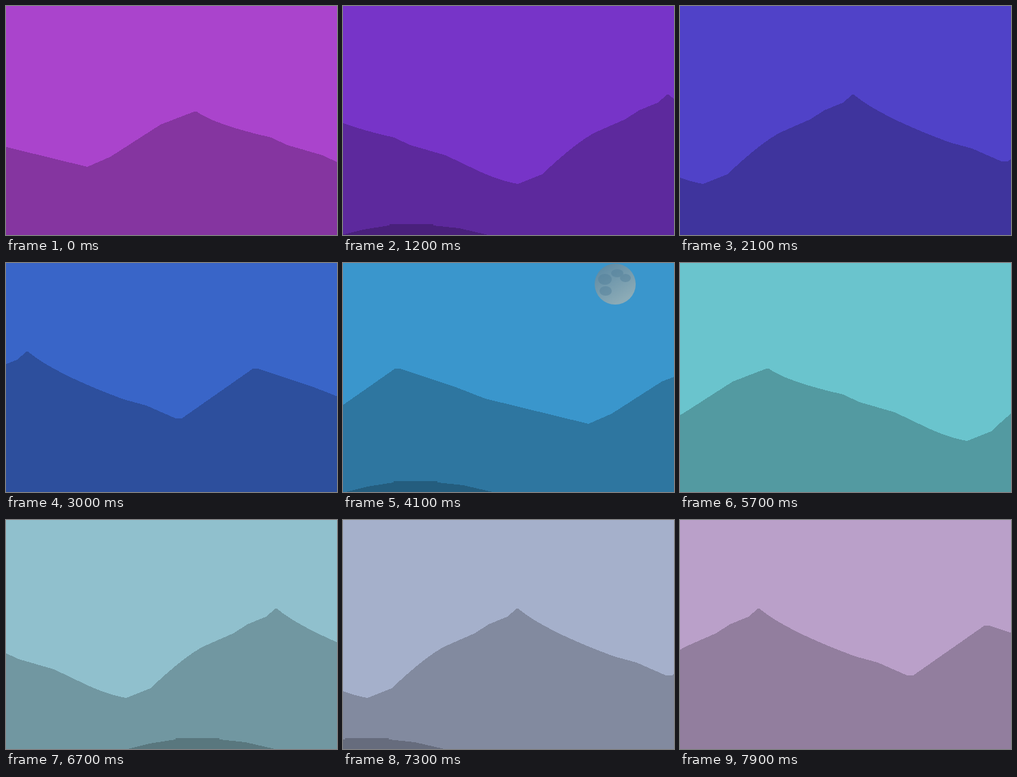
An HTML page that plays this animation: 484x336 px, repeating every 8 s.

```html
<!DOCTYPE html>
<html lang="en">
<head>
<meta charset="utf-8">
<title>Rolling hills</title>
<style>
  @property --distance { syntax: "<number>"; inherits: true; initial-value: 493; }

  html, body { margin: 0; width: 100%; height: 100%; overflow: hidden; }
  svg { display: block; width: 484px; height: 336px; animation: travel 8s infinite; }
  #back, #front { fill: #000; fill-opacity: .215; shape-rendering: crispEdges; }
  #back { transform: translateX(calc(var(--distance) * -1px)); }
  #front { transform: translateX(calc(var(--distance) * -1.75px)); }
  #moon { opacity: 0; animation: glow 8s linear infinite; }

  /* One step every 100 ms */
  @keyframes travel {
    0%     { --distance: 493;  background-color: #aa44cc; animation-timing-function: steps(12); }
    15%    { --distance: 806;  background-color: #7734c8; animation-timing-function: steps(18); }
    25%    { background-color: #523ec8; animation-timing-function: steps(10); }
    37.5%  { --distance: 1250; background-color: #3965c8; animation-timing-function: steps(11); }
    51.25% { --distance: 1535; background-color: #3a96cc; animation-timing-function: steps(16); }
    71.25% { --distance: 1924; background-color: #6ac4cd; animation-timing-function: steps(10); }
    83.75% { --distance: 2168; background-color: #90c0cd; animation-timing-function: steps(12); }
    98.75%, 100% { --distance: 2448; background-color: #baa0c9; }
  }
  @keyframes glow {
    0%, 40% { opacity: 0; }
    51.25% { opacity: .6; }
    55% { opacity: .75; }
    67.5%, 100% { opacity: 0; }
  }
</style>
</head>
<body>
<svg viewBox="0 0 484 336">
  <defs>
    <linearGradient id="shade" x1=".2" y1=".1" x2=".7" y2=".9">
      <stop offset="0" stop-color="#7a868b"/>
      <stop offset="1" stop-color="#c4baa8"/>
    </linearGradient>
    <path id="ridge" d="M0 336V130Q40 163 140 200L173 209 216 228Q221 229 225 228
      L329 155H336L420 183 461 199 612 236 646 221 719 174 768 155H772
      Q798 174 881 193L904 204 956 219 1002 241Q1036 257 1062 261
      L1097 247Q1149 198 1176 185L1219 166 1239 153 1266 142 1280 130H1282V336Z"/>
    <path id="mound" d="M126 336L158 328 196 322V320H260V322L298 326 341 336Z"/>
  </defs>
  <g id="moon">
    <circle cx="398" cy="31" r="30" fill="url(#shade)"/>
    <g fill="#66737a" opacity=".5">
      <ellipse cx="383" cy="24" rx="10" ry="8"/>
      <ellipse cx="401" cy="15" rx="9" ry="6"/>
      <ellipse cx="413" cy="22" rx="8" ry="6"/>
      <ellipse cx="384" cy="41" rx="9" ry="7"/>
    </g>
  </g>
  <g id="back">
    <use href="#ridge"/>
    <use href="#ridge" x="1282"/>
    <use href="#ridge" x="2564"/>
  </g>
  <g id="front">
    <use href="#mound"/>
    <use href="#mound" x="1282"/>
    <use href="#mound" x="2564"/>
    <use href="#mound" x="3846"/>
  </g>
</svg>
</body>
</html>
```
